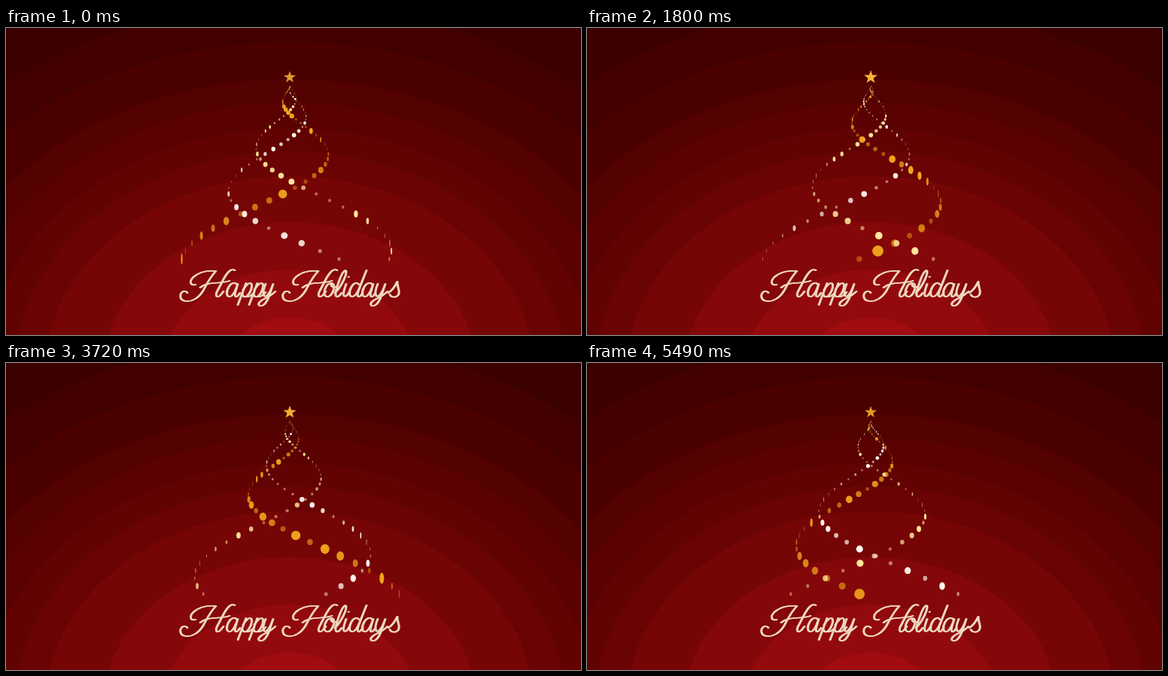
An HTML page with a canvas for the animation above (5.59 s loop, 764 by 408 pixels).

```html
<!DOCTYPE html>
<html lang="en">
<head>
<meta charset="utf-8">
<title>Happy Holidays</title>
<style>
html, body { margin: 0; width: 100%; height: 100%; overflow: hidden; background: #3c0000; }
canvas { display: block; }
</style>
</head>
<body>
<canvas id="stage" width="764" height="408" role="img" aria-label="Happy Holidays"></canvas>
<script>
const ctx = document.getElementById('stage').getContext('2d');
const LOOP = 5590, STEP = 148.2, TAU = Math.PI * 2, RAD = Math.PI / 180;
const CX = 377.5, TOP = 76.5, HEIGHT = 230.5, DOTS = 43;

// Background ellipses: vertical radius and colour, from the outside in
const rings = [
  [488, '#430000'], [438, '#4b0000'], [389, '#530101'], [358, '#5a0202'], [324, '#620303'],
  [293, '#6a0404'], [260, '#760506'], [199, '#840709'], [136, '#930a0d'], [72, '#a10c10']
];

// Strands: start angle and spin in degrees (per second), largest dot radius
const strands = [
  { color: '#fffaf0', start: 153.5, spin: 60.9, size: 5.3 },
  { color: '#f0a51c', start: -98.5, spin: 51.9, size: 7.7 },
  { color: '#ffe79c', start: 65, spin: 45.2, size: 5.3 }
];

const glyphs = {
  H: 'M252 341C245 343 243 337 249 331C257 324 268 322 279 323C271 331 267 340 262 349C256 359 247 364 239 363C231 362 230 355 234 351C237 349 240 350 241 352M304 322C299 319 294 325 290 332L280 351C278 357 281 359 285 355L289 350M258 345C268 336 283 341 297 336',
  a: 'M14 341C11 337 6 339 3 344C-1 351 0 357 4 357C8 357 12 349 15 340L12 350C10 356 12 359 15 356L18 352',
  p: 'M7 339L-4 368M3 348C7 341 12 337 14 340C16 344 12 354 7 357C4 358 2 356 2 353M7 357C12 358 15 355 18 351',
  y: 'M4 340C1 347 0 353 2 356C5 359 10 352 14 340L9 355C6 364 1 371 -4 369C-8 367 -3 362 4 359C9 357 13 354 17 350',
  o: 'M9 339C4 339 0 346 0 352C0 358 6 359 10 353C14 347 14 339 9 339C8 343 12 346 16 344',
  l: 'M0 352C6 347 15 331 15 324C15 320 11 323 8 330C4 340 0 350 1 355C2 359 6 357 9 352',
  i: 'M4 340C2 346 -1 353 1 356C3 358 6 355 8 351M7 331l.5 -.5',
  d: 'M13 341C10 337 6 339 3 344C-1 351 0 357 4 357C8 357 12 350 15 342L23 322L12 350C10 356 12 359 15 356L18 352',
  s: 'M0 352C5 349 9 343 12 337C11 344 17 350 13 355C10 359 3 358 2 354'
};
const lettering = [
  ['H', 0], ['a', 293], ['p', 312], ['p', 327], ['y', 341],
  ['H', 136], ['o', 423], ['l', 437], ['i', 448], ['d', 456], ['a', 473], ['y', 490], ['s', 508]
];

const greeting = new Path2D();
for (const [letter, x] of lettering) {
  greeting.addPath(new Path2D(glyphs[letter]), new DOMMatrix([1, 0, 0, 1, x, 0]));
}

const random = n => {
  const v = Math.sin(n * 12.9898) * 43758.5453;
  return v - Math.floor(v);
};
const wave = turns => 0.5 - 0.5 * Math.cos(turns * TAU);

function ellipse(x, y, rx, ry) {
  ctx.beginPath();
  ctx.ellipse(x, y, rx, ry, 0, 0, TAU);
  ctx.fill();
}

function drawBackground() {
  ctx.fillStyle = '#3b0000';
  ctx.fillRect(0, 0, 764, 408);
  for (const [r, color] of rings) {
    ctx.fillStyle = color;
    ellipse(377, 457, r * 1.25, r);
  }
}

function drawStrand({ color, start, spin, size }, index, t) {
  ctx.fillStyle = color;
  for (let j = 1; j <= DOTS; j++) {
    const k = DOTS - j, u = (j / DOTS) ** 2;
    const angle = (9.87 * k + 0.042 * k * k + start + spin * t) * RAD;
    const reach = HEIGHT * u * (0.6 - 0.035 * Math.cos(3.6 * u));
    const seed = index * 100 + j;
    const glow = wave(t / (1.6 + 1.4 * random(seed)) + random(seed + 500));
    const r = size * j / DOTS * (0.48 + 0.52 * glow);
    ctx.globalAlpha = 0.45 + 0.55 * glow;
    ellipse(CX + reach * Math.sin(angle), TOP + HEIGHT * u, Math.max(0.3, r * Math.abs(Math.cos(angle))), r);
  }
  ctx.globalAlpha = 1;
}

function drawStar(t) {
  const glow = wave((t - 0.12) / 2.75);
  const radius = 8.3 + 1.2 * glow;
  ctx.globalAlpha = 0.84 + 0.16 * glow;
  ctx.fillStyle = '#fdb735';
  ctx.beginPath();
  for (let i = 0; i < 10; i++) {
    const r = i % 2 ? radius * 0.4 : radius, a = i * TAU / 10;
    ctx.lineTo(377 + r * Math.sin(a), 65.5 - r * Math.cos(a));
  }
  ctx.fill();
  ctx.globalAlpha = 1;
}

// Two offset strokes act as a broad nib: thick stems, thin hairlines
function drawGreeting() {
  ctx.strokeStyle = '#f0d9c2';
  ctx.lineWidth = 1.7;
  ctx.lineCap = ctx.lineJoin = 'round';
  for (const shift of [-0.7, 0.7]) {
    ctx.save();
    ctx.translate(shift, 0);
    ctx.stroke(greeting);
    ctx.restore();
  }
}

const begin = performance.now();
function render() {
  const elapsed = Math.max(0, performance.now() - begin) % LOOP;
  const t = Math.floor(elapsed / STEP) * STEP / 1000;
  drawBackground();
  strands.forEach((strand, index) => drawStrand(strand, index, t));
  drawStar(t);
  drawGreeting();
  requestAnimationFrame(render);
}
render();
</script>
</body>
</html>
```
